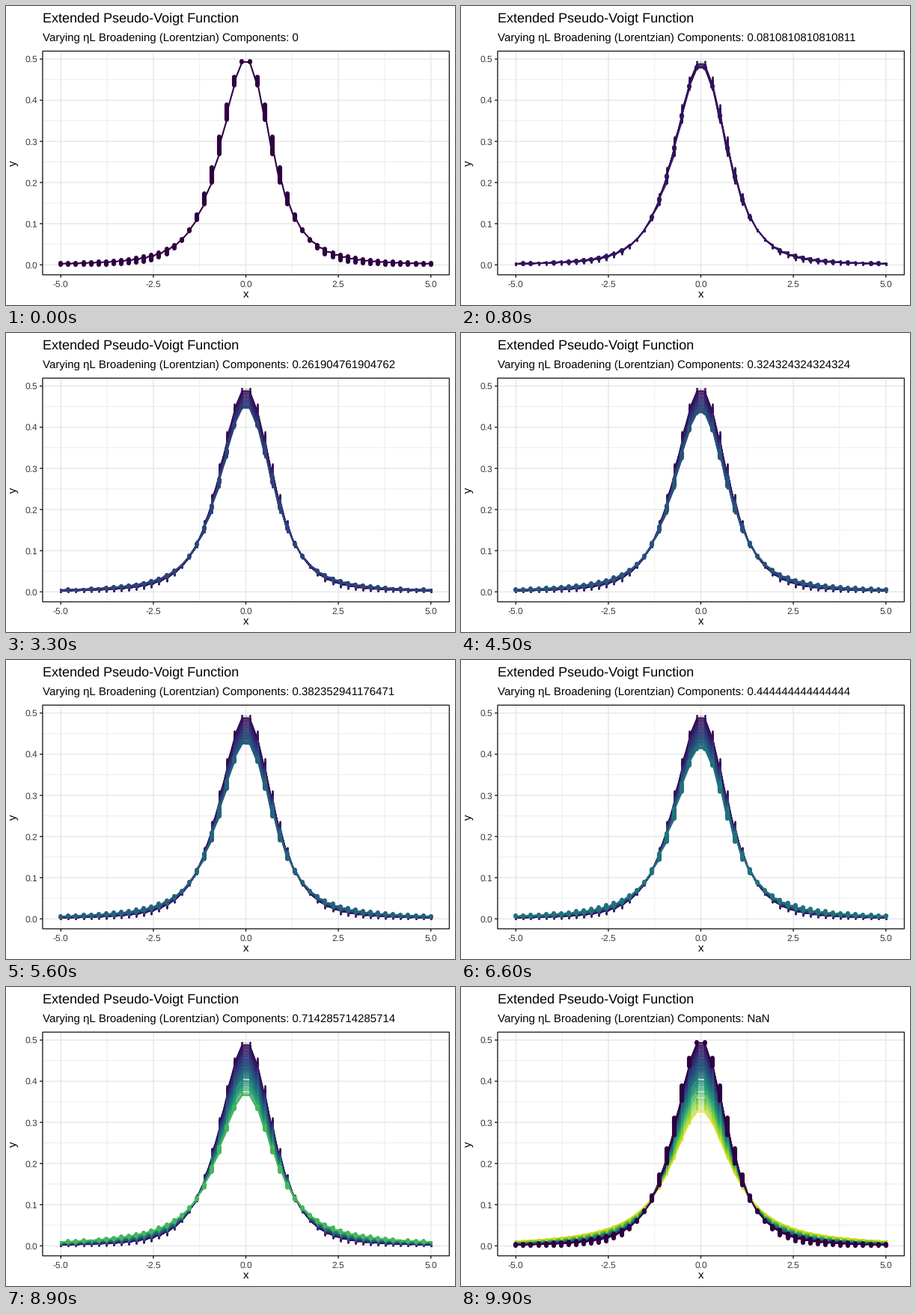
Recreate the animation shown at these times as a matplotlib script. Size 600 by 400 pixels, loop 10000 ms.

```python
from math import gcd

import matplotlib.pyplot as plt
import numpy as np
from matplotlib.animation import FuncAnimation
from matplotlib.collections import LineCollection
from matplotlib.patches import Rectangle

W, H, DPI = 600, 400, 72
FRAMES = 100
LEVELS = 19  # weight steps per component

plt.rcParams.update({
    "font.family": "Liberation Sans",
    "text.hinting": "none",
    "text.hinting_factor": 1,
})

x = np.linspace(-5, 5, 50)
lorentz = 1 / (np.pi * (1 + x**2))
irrational = 0.5 * (1 + x**2) ** -1.5
sech2 = 0.5 / np.cosh(x) ** 2


def px(v):
    return 320.5 + 49.44 * np.asarray(v)


def py(v):
    return 346.3 - 550.6 * np.asarray(v)


def profile(eta, t):
    """Pseudo-Voigt curve; t is the sech share of the non-Lorentzian part."""
    return py(eta * lorentz + (1 - eta) * ((1 - t) * irrational + t * sech2))


def shade(eta):
    """Viridis, darkened slightly by a gamma shift."""
    r, g, b = np.array(plt.get_cmap("viridis")(float(eta))[:3]) ** 1.22
    return np.clip([r + 0.1 * (g - r), g, b], 0, 1)


class State:
    def __init__(self, p, s):
        self.eta = p / (p + s)
        self.color = shade(self.eta)
        lo, last = 0, 1
        if s:
            lo = max(0, 1 - LEVELS / s)
            k = 2 * LEVELS // s
            if p:
                k = min(k, LEVELS // p)
            last = min(LEVELS, k * s) / (k * s)
        xs = px(x)
        # each x is entered at the first row and left at the last one
        ys = np.column_stack([profile(self.eta, lo), profile(self.eta, last)])
        self.line = np.column_stack([np.repeat(xs, 2), ys.ravel()])
        ends = [profile(self.eta, lo), profile(self.eta, 1 - lo) + 0.01]
        self.bars = np.stack([np.column_stack([xs, e]) for e in ends], axis=1)


pairs = [(0, 1), (1, 0)] + [
    (p, s)
    for p in range(1, LEVELS + 1)
    for s in range(1, 2 * LEVELS + 1)
    if gcd(p, s) == 1
]
states = sorted((State(p, s) for p, s in pairs), key=lambda st: st.eta)
N = len(states)
etas = np.array([st.eta for st in states])

# pace through the sorted states; the last step is the undefined 0/0 state
key_frames = [0, 16, 33, 56, 76, 89, 99]
key_etas = [0, 4 / 27, 11 / 42, 13 / 34, 7 / 13, 5 / 7]
key_ranks = [int(np.argmin(abs(etas - e))) for e in key_etas] + [N]
ranks = np.rint(np.interp(range(FRAMES), key_frames, key_ranks)).astype(int)

trail_lines = [st.line for st in states]
trail_colors = np.array([[*st.color, 0.25] for st in states])
dot_ids = np.array([i for i in range(N) if i % 3 == 0 or i > N - 40])
dot_bars = np.concatenate([states[i].bars for i in dot_ids])
dot_colors = np.repeat([states[i].color for i in dot_ids], len(x), axis=0)

fig = plt.figure(figsize=(W / DPI, H / DPI), dpi=DPI, facecolor="white")
ax = fig.add_axes([0, 0, 1, 1])
ax.set(xlim=(0, W), ylim=(H, 0))
ax.axis("off")

LEFT, RIGHT, TOP, BOTTOM = 48.9, 592.4, 60.4, 359.6
GRID, DARK, LABEL = "#e7e7e7", "#242424", "#3b3b3b"


def rule(xs, ys, color, lw, z):
    ax.plot(xs, ys, color=color, lw=lw, zorder=z, snap=False,
            solid_capstyle="butt")


def label(tx, ty, text, size, color="black", **kw):
    return ax.text(tx, ty, text, fontsize=size, color=color,
                   va="baseline", zorder=10, **kw)


for v in (-3.75, -1.25, 1.25, 3.75):
    rule([px(v)] * 2, [TOP, BOTTOM], GRID, 0.73, 1)
for v in np.arange(0.05, 0.5, 0.1):
    rule([LEFT, RIGHT], [py(v)] * 2, GRID, 0.73, 1)
for v in (-5, -2.5, 0, 2.5, 5):
    rule([px(v)] * 2, [TOP, BOTTOM], GRID, 1.45, 1.1)
    rule([px(v)] * 2, [BOTTOM, BOTTOM + 3.75], DARK, 1.45, 8)
    label(px(v), 376, f"{v:.1f}", 12, LABEL, ha="center")
for v in np.arange(6) / 10:
    rule([LEFT, RIGHT], [py(v)] * 2, GRID, 1.45, 1.1)
    rule([LEFT - 3.75, LEFT], [py(v)] * 2, DARK, 1.45, 8)
    label(42, py(v) + 4.3, f"{v:.1f}", 12, LABEL, ha="right")

ax.add_patch(Rectangle((LEFT, TOP), RIGHT - LEFT, BOTTOM - TOP, fill=False,
                       ec=DARK, lw=1.4, zorder=9, snap=False))

label(48.6, 21, "Extended Pseudo-Voigt Function", 18)
subtitle = label(48.6, 47, "", 15)
label(320.5, 389.7, "x", 15, ha="center")
label(14.5, 210, "y", 15, ha="center", rotation=90, rotation_mode="anchor")


def strokes(lw, z):
    coll = LineCollection([], linewidths=lw, zorder=z, capstyle="round",
                          joinstyle="round")
    return ax.add_collection(coll, autolim=False)


trail = strokes(1.07, 3)
curve = strokes(2.1, 4)
trail_dots = strokes(2.5, 5)
dots = strokes(6.1, 6)


def update(frame):
    rank = ranks[frame]
    undefined = rank >= N
    now = states[0 if undefined else rank]

    trail.set_segments(trail_lines[:rank])
    trail.set_color(trail_colors[:rank])
    n_dots = int(np.searchsorted(dot_ids, rank)) * len(x)
    trail_dots.set_segments(dot_bars[:n_dots])
    trail_dots.set_color(dot_colors[:n_dots])

    curve.set_segments([now.line])
    curve.set_color([now.color])
    dots.set_segments(now.bars)
    dots.set_color([now.color])

    value = "NaN" if undefined else f"{now.eta:.15g}"
    subtitle.set_text(
        f"Varying ηL Broadening (Lorentzian) Components: {value}")
    return trail, curve, trail_dots, dots, subtitle


anim = FuncAnimation(fig, update, frames=FRAMES, interval=100, repeat=True,
                     repeat_delay=0, blit=False)
plt.show()
```
